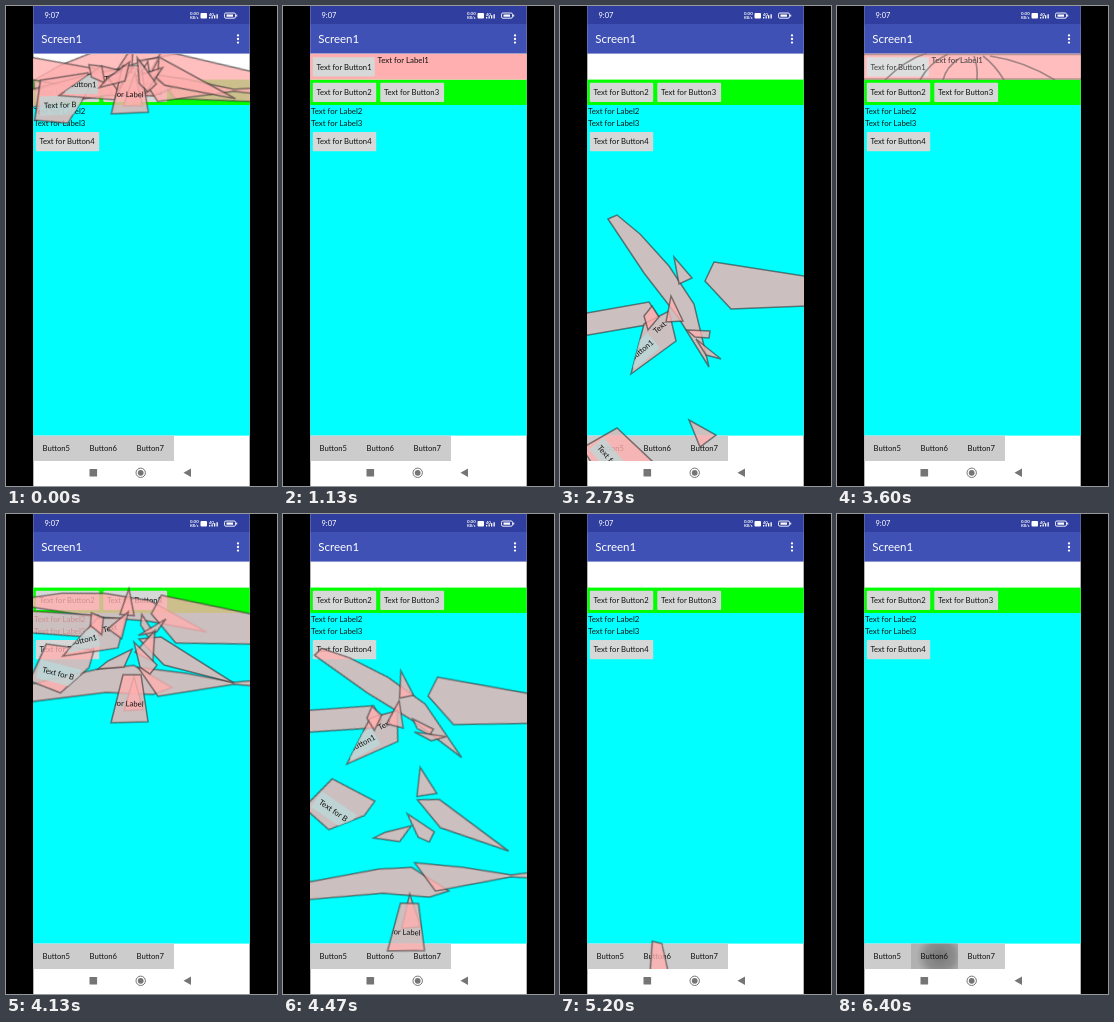
Animation of 271x480 px, one loop 6470 ms. Source, as an HTML page:

```html
<!DOCTYPE html>
<html lang="en">
<head>
<meta charset="utf-8">
<title>Breaking row</title>
<style>
html, body { margin: 0; width: 100%; height: 100%; overflow: hidden; background: #000; }
svg { display: block; width: 100vw; height: 100vh; }
text { font: 7.7px Lato, "Open Sans", sans-serif; fill: #111; white-space: pre; }
.label { font-size: 7.9px; }
</style>
</head>
<body>
<svg id="stage" viewBox="0 0 271 480">
  <defs>
    <clipPath id="screen"><rect x="27" y="48" width="217" height="407"/></clipPath>
    <clipPath id="rowBox"><rect x="27" y="47.6" width="217" height="26.4"/></clipPath>
    <clipPath id="key5"><rect x="27" y="429.6" width="47" height="25.4"/></clipPath>
    <clipPath id="key6"><rect x="74" y="429.6" width="47" height="25.4"/></clipPath>
    <radialGradient id="ink">
      <stop offset="0" stop-color="#555" stop-opacity=".75"/>
      <stop offset=".6" stop-color="#666" stop-opacity=".55"/>
      <stop offset="1" stop-color="#777" stop-opacity="0"/>
    </radialGradient>
    <filter id="soft" x="-20%" y="-50%" width="140%" height="200%"><feGaussianBlur stdDeviation=".7"/></filter>
  </defs>
  <rect width="271" height="480"/>
  <rect x="27.3" width="216.4" height="480" fill="#fff"/>
  <rect x="27.3" width="216.4" height="18.5" fill="#303f9f"/>
  <rect x="27.3" y="18" width="216.4" height="29.6" fill="#3f51b5"/>
  <g fill="#fff">
    <text x="38.5" y="12.3" style="font-size:7.5px;fill:#fff">9:07</text>
    <text x="35.3" y="37" style="font-size:11.5px;fill:#fff">Screen1</text>
    <text x="184" y="9.3" style="font-size:4.4px;font-weight:700;fill:#fff">0.00</text>
    <text x="184" y="12.8" style="font-size:3.8px;font-weight:700;fill:#fff">KB/s</text>
    <rect x="194.5" y="7" width="6.5" height="5.5" rx="1"/>
    <text x="203" y="9.8" style="font-size:4px;font-weight:700;fill:#fff">4G</text>
    <path d="M203 12.5v-1.5h1.3v1.5zM205.5 12.5v-2.2h1.3v2.2zM208 12.5v-3.2h1.3v3.2zM210.5 12.5v-4.3h1.3v4.3z"/>
    <rect x="218.5" y="7" width="11" height="5.2" rx="1.4" fill="none" stroke="#fff" stroke-width=".9"/>
    <rect x="220.5" y="8.5" width="6.5" height="2.2"/>
    <rect x="230.2" y="8.6" width="1" height="2"/>
    <circle cx="232" cy="29.4" r="1.15"/><circle cx="232" cy="33" r="1.15"/><circle cx="232" cy="36.6" r="1.15"/>
  </g>
  <rect x="27.3" y="73.6" width="216.4" height="25.6" fill="#0f0"/>
  <rect x="27.3" y="99" width="216.4" height="330.6" fill="#0ff"/>
  <g id="fixed"></g>
  <rect x="27.3" y="429.6" width="140.7" height="25.4" fill="#ccc"/>
  <g clip-path="url(#key5)"><rect id="tint5" x="27" y="429" width="47" height="26" fill="#777"/><circle id="ink5" cx="52" cy="442" fill="url(#ink)"/></g>
  <g clip-path="url(#key6)"><rect id="tint6" x="74" y="429" width="47" height="26" fill="#777"/><circle id="ink6" cx="103" cy="442" fill="url(#ink)"/></g>
  <text x="36.5" y="445">Button5</text><text x="83.5" y="445">Button6</text><text x="130.5" y="445">Button7</text>
  <g id="row" clip-path="url(#rowBox)">
    <rect x="27.3" y="47.6" width="216.4" height="26" fill="#ffafaf"/>
    <g id="rowItems"></g>
    <g id="cracks" fill="none"></g>
    <path id="rim" d="M27 48.5H244M27 73H244" stroke="#755" stroke-width="1.3" filter="url(#soft)"/>
  </g>
  <g clip-path="url(#screen)"><g id="pieces"></g></g>
  <g fill="#757575">
    <rect x="83.5" y="463" width="7.6" height="7.6" rx=".6"/>
    <circle cx="134.7" cy="466.8" r="4.7" fill="none" stroke="#757575"/><circle cx="134.7" cy="466.8" r="2.9"/>
    <path d="M177.5 466.8L185 462.6V471z"/>
  </g>
</svg>
<script>
const LOOP = 6470, STEP = 66.7, FALL = 3530;
const $ = id => document.getElementById(id);
const clamp = v => Math.max(0, Math.min(1, v));

function add(parent, name, attrs, text) {
  const el = document.createElementNS('http://www.w3.org/2000/svg', name);
  for (const key in attrs) el.setAttribute(key, attrs[key]);
  if (text) el.textContent = text;
  parent.appendChild(el);
  return el;
}

function button(parent, n, x, y, width) {
  add(parent, 'rect', { x, y, width, height: 19.2, rx: 1, fill: '#d6d7d7' });
  add(parent, 'text', { x: x + 3.6, y: y + 12.4 }, 'Text for Button' + n);
}

function label(parent, n, x, y) {
  add(parent, 'text', { x, y, class: 'label' }, 'Text for Label' + n);
}

button($('fixed'), 2, 29.8, 76.8, 63.4);
button($('fixed'), 3, 97.3, 76.8, 63.8);
button($('fixed'), 4, 29.8, 126, 63.4);
label($('fixed'), 2, 28, 107.6);
label($('fixed'), 3, 28, 119.8);
button($('rowItems'), 1, 29.8, 51.2, 62);
label($('rowItems'), 1, 94.5, 57.2);

const cracks = [
  'M90 47Q68 54 48 74', 'M111 48Q92 57 83 74', 'M123 52Q109 61 106 74',
  'M137 50Q141 60 140 74', 'M146 50Q158 59 167 74', 'M153 50Q187 55 218 74'
].map(d => add($('cracks'), 'path', { d, pathLength: 1 }));

// ref: time of the given outline, drop: fall speed, spin: degrees per 600 ms
const pieces = [
  { ref: 1200, drop: 44, spin: 48, at: '48,213 57,209 80,228 109,260 134,298 149,361 118,311 84,267' },
  { ref: 1200, drop: 43.5, spin: -3, at: '154,256 250,271 250,300 171,303 145,275' },
  { ref: 1200, drop: 51, spin: -14, at: '5,311 89,296 98,310 92,318 5,333' },
  { ref: 600, drop: 108, spin: 4, at: '20,169 95,152 128,149 166,171 147,178 100,176 20,186' },
  { ref: 600, drop: 104, spin: -3, at: '132,151 180,157 228,166 250,164 250,170 228,168 152,180' },
  { ref: 600, drop: 88, spin: 8, at: '133,123 155,121 228,167 158,149' },
  { ref: 1200, drop: 75, spin: 36, at: '22,442 57,422 92,455 78,466 40,470',
    labels: [['Text for B', 37, 442, 50, 42]] },
  { ref: 1200, drop: 53, spin: -28, at: '84,318 109,305 116,335 71,368',
    labels: [['Button1', 73, 355, -40, 33], ['Text', 96, 328, -40, 0]] },
  { ref: 1200, drop: 44, spin: -30, at: '114,251 132,272 119,278' },
  { ref: 1200, drop: 49, spin: -40, at: '111,290 123,315 106,316' },
  { ref: 1200, drop: 51, spin: 35, at: '84,310 92,300 99,311 88,324' },
  { ref: 1200, drop: 54, spin: -55, at: '127,324 150,325 149,332 135,331' },
  { ref: 1200, drop: 58, spin: 70, at: '136,333 161,353 146,349' },
  { ref: 1200, drop: 74, spin: -65, at: '129,414 156,429 140,441' },
  { ref: 600, drop: 117, spin: -6, at: '128,160 137,193 118,194' },
  { ref: 600, drop: 123, spin: 2, at: '117,158 135,158 142,205 105,206',
    labels: [['for Label', 108, 189, 2, 0]] },
  { ref: 600, drop: 91, spin: -20, at: '128,126 151,149 144,158 134,151' },
  { ref: 600, drop: 93, spin: 22, at: '102,145 126,133 118,151 92,153' }
];

pieces.forEach((p, i) => {
  const points = p.at.split(' ').map(s => s.split(',').map(Number));
  p.x = points.reduce((sum, q) => sum + q[0], 0) / points.length;
  p.y = points.reduce((sum, q) => sum + q[1], 0) / points.length;
  p.el = add($('pieces'), 'g', {});
  add(p.el, 'polygon', { points: p.at, fill: '#ffafaf', 'fill-opacity': .8 });
  add(p.el, 'polygon', { points: p.at, fill: 'none', stroke: '#333', 'stroke-opacity': .6, 'stroke-width': 1.5, filter: 'url(#soft)' });
  if (!p.labels) return;
  const clip = add(p.el, 'clipPath', { id: 'cut' + i });
  add(clip, 'polygon', { points: p.at });
  const inner = add(p.el, 'g', { 'clip-path': `url(#cut${i})` });
  for (const [text, x, y, angle, plate] of p.labels) {
    const g = add(inner, 'g', { transform: `translate(${x} ${y}) rotate(${angle})` });
    if (plate) add(g, 'rect', { x: -4, y: -12, width: plate, height: 19, fill: '#b8dcdc', opacity: .7 });
    add(g, 'text', {}, text);
  }
});

const gravity = u => (Math.max(0, u - 114) / 486) ** 2;

function drawPieces(u) {
  const shown = u > 90 && u < 1740;
  $('pieces').style.display = shown ? '' : 'none';
  if (!shown) return;
  $('pieces').setAttribute('opacity', clamp((u - 90) / 160));
  for (const p of pieces) {
    const dy = p.drop * (gravity(u) - gravity(p.ref));
    const angle = p.spin * (u - p.ref) / 600;
    p.el.setAttribute('transform', `translate(0 ${dy}) rotate(${angle} ${p.x} ${p.y})`);
  }
}

function drawRow(t, u) {
  const falling = u >= 0;
  $('row').setAttribute('opacity', falling ? .82 * clamp((270 - u) / 140) : 1);
  $('rim').setAttribute('opacity', falling ? .6 : 0);
  const grow = clamp((t - 2070) / 1200);
  cracks.forEach((el, i) => {
    const reach = falling ? 1 : clamp(grow * 1.4 - (i ? .1 : -.2));
    el.setAttribute('opacity', t < 2070 ? 0 : falling ? .65 : .9);
    el.setAttribute('stroke', falling ? '#544' : '#fff');
    el.setAttribute('stroke-width', falling ? 1.7 : i ? .7 : 1.2);
    el.setAttribute('stroke-dasharray', `${reach} 2`);
  });
  $('cracks').setAttribute('filter', falling ? 'url(#soft)' : 'none');
}

function ripple(n, age, hold) {
  const fade = age < 0 ? 0 : clamp((hold + 330 - age) / 330);
  $('ink' + n).setAttribute('r', 6 + 20 * clamp(age / 450));
  $('ink' + n).setAttribute('opacity', age > hold ? fade * .2 : fade * .85);
  $('tint' + n).setAttribute('opacity', .32 * fade * clamp(age / 200));
}

function render(ms) {
  const t = Math.floor((ms % LOOP + 8) / STEP) * STEP % (STEP * 97);
  // two brief out-of-order flashes interrupt the steady state
  let u = t - FALL;
  if (t < 60) u = 331;
  else if (t > 2720 && t < 2780) u = 1200;
  drawRow(t, u);
  drawPieces(u);
  ripple(5, t - 1400, 600);
  ripple(6, t - 5995, 500);
}

const start = performance.now();
function tick() {
  render(performance.now() - start);
  requestAnimationFrame(tick);
}
tick();
</script>
</body>
</html>
```
